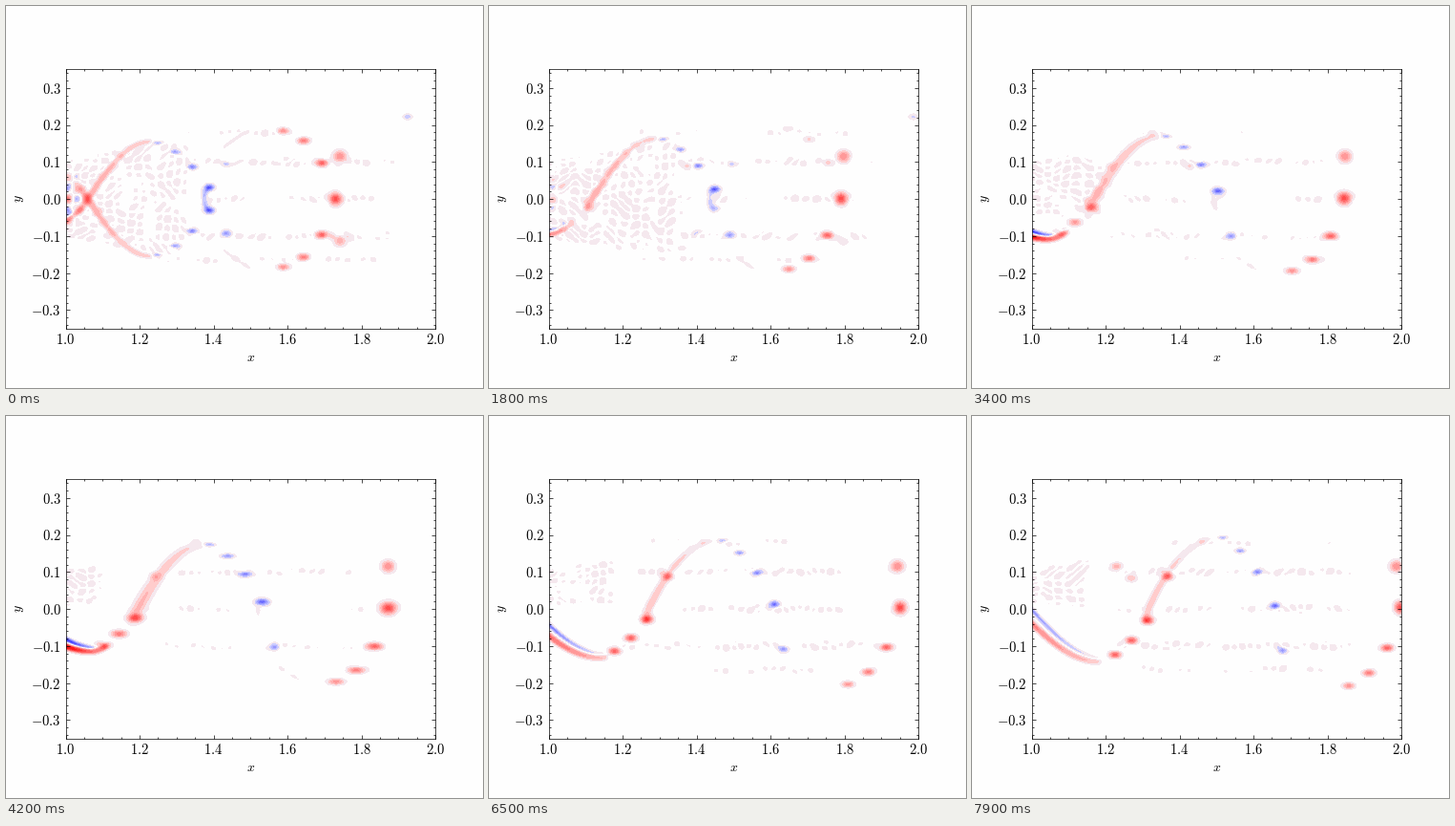
Recreate the animation shown at these times as a matplotlib script. Size 500 by 400 pixels, loop 8000 ms.

```python
import numpy as np
import matplotlib.pyplot as plt
from matplotlib.animation import FuncAnimation
from matplotlib.ticker import FuncFormatter, MultipleLocator

FRAMES, STEP = 80, 100
DRIFT = 0.0034  # downstream travel per frame
PAPER = "#fefefe"

plt.rcParams.update({"mathtext.fontset": "cm", "font.size": 10,
                     "axes.linewidth": 0.5, "xtick.top": True, "ytick.right": True})
for t in ("xtick", "ytick"):
    plt.rcParams.update({t + ".direction": "in", t + ".labelsize": 10.5,
                         t + ".major.size": 3, t + ".minor.size": 1.5,
                         t + ".major.width": 0.5, t + ".minor.width": 0.5})

gx = np.linspace(1, 2, 300)
gy = np.linspace(-0.25, 0.25, 150)
X, Y = np.meshgrid(gx, gy)

# short-lived vortices: x, y, strength, peak time, duration
STRAYS = np.array([
    (1.402, 0.090, 0.42, 26, 9),
    (1.310, -0.085, 0.32, 26, 6),
    (1.230, 0.115, 0.30, 79, 9),
    (1.270, 0.083, 0.24, 79, 9),
    (1.368, 0.088, 0.50, 79, 35),
    (1.434, 0.095, -0.30, 0, 30),
    (1.925, 0.222, -0.25, 0, 40),
])

# random plane waves behind the faint background ripples
rng = np.random.default_rng(11)
WAVES = 14
KX = 2 * np.pi / rng.uniform(0.035, 0.08, WAVES)
KY = 2 * np.pi / rng.uniform(0.022, 0.045, WAVES) * rng.choice([-1, 1], WAVES)
PHASE = rng.uniform(0, 2 * np.pi, WAVES)
OMEGA = rng.normal(0, 0.06, WAVES)


def bump(v, centre, width):
    return np.exp(-((v - centre) / width) ** 2)


def gaussians(parts):
    """Sum of axis-aligned Gaussians given as rows x, y, a, sx, sy."""
    x, y, a, sx, sy = np.vstack(parts).T[:, :, None]
    ex = np.exp(-((gx - x) / sx) ** 2 / 2)
    ey = a * np.exp(-((gy - y) / sy) ** 2 / 2)
    return ey.T @ ex


def rows(x, y, a, sx, sy):
    return np.column_stack(np.broadcast_arrays(x, y, a, sx, sy))


def sheet(x, y, amp, width):
    """A curved ribbon made of closely spaced round Gaussians."""
    ds = np.hypot(np.gradient(x), np.gradient(y))
    return rows(x, y, amp * ds / (np.sqrt(2 * np.pi) * width), width, width)


def vortices(n):
    t = n / (FRAMES - 1)
    wide = 1 + 0.35 * bump(n, 42, 8)
    fade = bump(n, 0, 17)

    # leading red bow: the lower half survives, the upper half fades
    k = np.arange(-3, 4)
    m = np.abs(k)
    size = np.where(k == 0, 0.0105, 0.0062 - 0.0004 * m)
    parts = [rows(1.73 - 0.037 * m ** 1.22 + DRIFT * n,
                  0.2 * np.tanh(0.53 * k) + (0.008 * k + 0.004 * (k == 0)) * t,
                  (0.70 - 0.1 * m) * np.where(k > 0, fade, 1),
                  0.0105 * wide, size)]
    # its companions just outside the centre
    parts.append(rows(1.742 + 0.0031 * n, np.array([0.115, -0.112]),
                      np.array([0.45, 0.32 * fade]), 0.0112, 0.0098))

    # blue bow: the upper half survives
    k = np.arange(4) + 0.5
    y = 0.18 * np.tanh(0.35 * k) + 0.033 * np.log(k) * t
    for side, keep in ((1, 1), (-1, fade)):
        parts.append(rows(1.413 - 0.047 * k + DRIFT * n, side * y,
                          (0.11 * k - 0.70) * keep,
                          0.0095 * wide, 0.0069 - 0.0008 * k))
    parts.append(rows(1.434 + 0.0031 * n, -0.093 - 0.019 * t, -0.43, 0.0098, 0.0068))
    y = np.linspace(-0.03, 0.03, 20)
    parts.append(sheet(1.374 + 12 * y ** 2 + DRIFT * n, y,
                       -0.28 * bump(n, 0, 32), 0.0065))

    # red vortices rolling up out of the sheet
    k = np.arange(3) + 0.5
    parts.append(rows(1.337 - 0.0445 * k - DRIFT * (FRAMES - 1 - n),
                      -0.173 * np.tanh(0.36 * k) * (0.55 + 0.45 * t),
                      0.62 * np.clip((n - 12) / 36, 0, 1),
                      0.0100 * wide, 0.0066 - 0.0004 * k))

    x, y, a, peak, life = STRAYS.T
    parts.append(rows(x + DRIFT * (n - peak), y, a * bump(n, peak, life),
                      0.0095, 0.0062))
    return parts


def sheets(n):
    t = n / (FRAMES - 1)
    s = np.linspace(0, 1, 70)
    parts = []

    # rising arc, with a mirror image that dies out early
    x = 1.04 + DRIFT * n + 0.19 * s
    y = -0.03 + (0.185 + 0.035 * t) * np.sin(np.pi * s / 2) ** (1 - 0.25 * t)
    amp = (0.34 - 0.10 * t) * (1 - (0.45 + 0.3 * t) * s)
    width = (0.0068 + 0.005 * bump(n, 42, 14)) * (1 - 0.45 * s)
    parts.append(sheet(x, y, amp, width))
    parts.append(sheet(x, -y, amp * bump(n, 0, 9), width))

    # flapping shear layer: a trough carried downstream, steeper ahead of it
    trough = 1 + 0.0031 * (n - 20)
    x = np.linspace(0.985, max(trough + 0.09 * (1 - t), 1.045), 70)
    steep = np.where(x > trough, 12, 7.1)
    red = -(0.097 + 0.25 * (trough - 1)) * np.cos(steep * (x - trough))
    gap = 0.009 + 0.15 * np.maximum(trough - x, 0)
    power = 0.5 + 0.6 * bump(n, 41, 19)
    parts.append(sheet(x, red, power * (1 - 0.6 * s), 0.0050))
    parts.append(sheet(x, red + gap, -power * (1 - 0.85 * s), 0.0048))

    # thin streaks left behind
    x = 1.42 + 0.085 * s + DRIFT * n
    y = 0.13 + 0.06 * s ** 0.8 + 0.02 * t
    faint = 0.08 * np.sin(np.pi * s) ** 0.3
    parts.append(sheet(x, -y, faint * (1 - 0.5 * t), 0.0032))
    parts.append(sheet(x, y, faint * bump(n, 0, 14), 0.0032))
    return parts


def checker(n):
    """Alternating cells at the inlet, washed out early on."""
    dx = X - 1.06 - DRIFT * n
    cells = np.cos(np.pi * dx / 0.0275) * np.cos(np.pi * Y / 0.03)
    return 0.5 * cells * bump(X, 1, 0.045) * bump(Y, 0, 0.065) * bump(n, 0, 20)


def ripples(n):
    spread = 1 + 1.8 * np.clip(X - 1, 0, 0.35)
    u, v = Y / spread, X - DRIFT * n
    noise = sum(np.cos(kx * v + ky * u + p + w * n)
                for kx, ky, p, w in zip(KX, KY, PHASE, OMEGA)) / np.sqrt(WAVES / 2)

    # fan behind the inlet, smallest while the flow is calm
    calm = bump(n, 43, 11)
    reach = 1.22 + 0.20 * bump(n, 10, 22) - 0.10 * calm
    floor = -0.16 * (1 - np.clip((n - 24) / 16, 0, 1))
    fan = (np.clip((reach - X) / 0.08, 0, 1)
           * np.clip((0.11 * spread - np.abs(Y)) / 0.015, 0, 1)
           * np.clip((Y - floor) / 0.02, 0, 1))

    # wakes trailing the vortices in rows
    wakes = sum(a * bump(Y, y, 0.013) for y, a in
                ((0.1, 1), (-0.1, 1), (0, 0.9), (0.18, 0.6), (-0.165, 0.6)))
    wakes = wakes * np.clip((X - 1.1) / 0.2, 0, 1) * np.clip((1.98 - X) / 0.2, 0, 1)
    env = np.maximum(0.054 * fan, 0.056 * wakes * (1 - 0.4 * calm))
    return np.clip(noise * env, -0.12, 0.12)


def field(n):
    main = gaussians(vortices(n) + sheets(n)) + checker(n)
    return main + ripples(n) * np.exp(-(main / 0.25) ** 2)


def shade(k):
    if k == 0:
        return PAPER
    if abs(k) == 1:
        return "#f5e8ee"
    c = 1 - abs(k) / 10
    return (1, c, c) if k > 0 else (c, c, 1)


edges = 0.05 + 0.1 * np.arange(10)
LEVELS = np.concatenate([-edges[::-1], edges])
COLORS = [shade(k) for k in range(-10, 11)]

fig, ax = plt.subplots(figsize=(5, 4), dpi=100, facecolor=PAPER)
ax.set_facecolor(PAPER)
ax.set(xlim=(1, 2), ylim=(-0.35, 0.35), aspect="equal",
       xticks=1 + np.arange(6) / 5, yticks=np.arange(-3, 4) / 10)
ax.set_xlabel("$x$", labelpad=2.6)
ax.set_ylabel("$y$", labelpad=3.5)
for axis, minor in ((ax.xaxis, 0.05), (ax.yaxis, 0.02)):
    axis.set_major_formatter(FuncFormatter(lambda v, _: f"${v:.1f}$"))
    axis.set_minor_locator(MultipleLocator(minor))


def draw(n):
    for old in list(ax.collections):
        old.remove()
    return [ax.contourf(gx, gy, field(n), levels=LEVELS, colors=COLORS, extend="both")]


anim = FuncAnimation(fig, draw, frames=FRAMES, interval=STEP,
                     init_func=lambda: [], repeat=True, repeat_delay=0)
plt.show()
```
